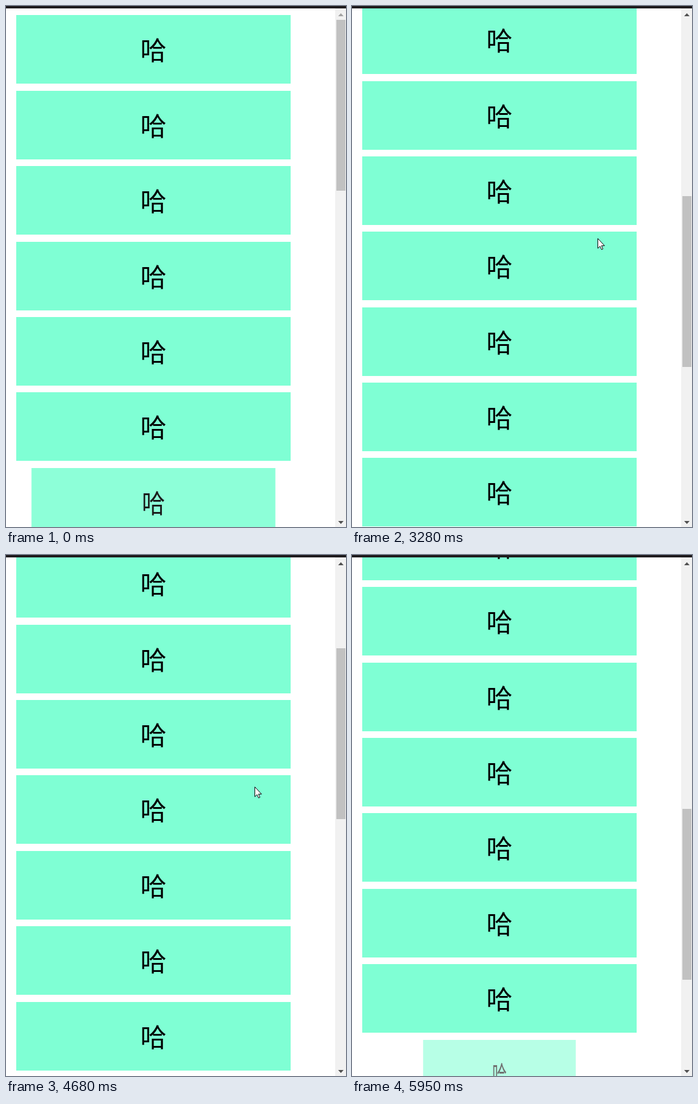
These frames come from a looping animation (565 by 866 pixels, 6190 ms). An HTML page:

```html
<!DOCTYPE html>
<html lang="zh-CN">
<head>
<meta charset="utf-8">
<title>Scroll reveal</title>
<style>
  html, body { margin: 0; width: 100%; height: 100%; overflow: hidden; background: #fff; }
  #stage { position: absolute; left: 0; top: 0; width: 565px; height: 866px; overflow: hidden; }
  #view { position: absolute; left: 0; top: 4px; width: 547px; height: 862px; overflow: hidden; }
  .item {
    position: absolute; left: 17px; top: 0; width: 456px; height: 114px;
    background: #7fffd4; color: #000; text-align: center;
    font: 43.5px/114px "Noto Sans CJK SC", "Noto Sans CJK JP", sans-serif;
  }
  #top { position: absolute; left: 0; top: 0; width: 565px; height: 4px; background: #1e1b1e; }
  #bar { position: absolute; left: 547px; top: 4px; width: 18px; height: 862px; background: #f1f1f1; }
  #thumb { position: absolute; left: 2px; top: 19px; width: 15px; height: 284px; background: #c1c1c1; }
  #overlay { position: absolute; left: 0; top: 0; }
</style>
</head>
<body>
<div id="stage">
  <div id="view"></div>
  <div id="top"></div>
  <div id="bar"><div id="thumb"></div></div>
  <svg id="overlay" width="565" height="866">
    <path id="up" d="M552 17h9l-4.5-5z"/>
    <path d="M552 856h9l-4.5 5z" fill="#505050"/>
    <path id="cursor" d="M.5 .5V16.8L4.2 13.3L6.7 18.8L9 17.8L6.6 12.4H11.6Z" fill="#fff" stroke="#000"/>
  </svg>
</div>
<script>
const LOOP = 6190, TICK = 30, PHASE = 10;
const COUNT = 20, PITCH = 125.38, HEIGHT = 114;
const VIEW_TOP = 4, VIEW_BOTTOM = 869, FIRST_TOP = 15.4;
const THUMB_RATIO = 0.328;
const ENTER = 1870, LEAVE = 5950;
const GLANCE = 761.9, PAUSE = 893.9, END = 1215.9;

const $ = id => document.getElementById(id);
const clamp = v => Math.min(1, Math.max(0, v));

// Eased progress of one move
function ease(t, start, duration) {
  const p = clamp((t - start) / duration);
  return p * p * (3 - 2 * p);
}

// Average progress of evenly spaced wheel flicks
function flicks(t, count, start, gap, duration) {
  let sum = 0;
  for (let i = 0; i < count; i++) sum += ease(t, start + i * gap, duration);
  return sum / count;
}

function scrollAt(t) {
  return GLANCE * ease(t, 2100, 350)
    + (PAUSE - GLANCE) * flicks(t, 2, 2530, 480, 270)
    - PAUSE * flicks(t, 3, 3530, 310, 189)
    + END * flicks(t, 3, 4420, 387.5, 255);
}

function cursorAt(t) {
  const enter = ease(t, ENTER, 270), nudge = ease(t, 2530, 340), drift = ease(t, 3530, 770);
  const exit = ease(t, 5500, 300), slip = ease(t, 5800, 150);
  return [
    559 - 154 * enter + 3 * nudge + 5 * drift + 125 * exit + 4 * slip,
    463 - 80 * enter + 3 * nudge - drift + 461 * exit + 20 * slip
  ].map(Math.round);
}

const items = Array.from({ length: COUNT }, () => {
  const el = document.createElement('div');
  el.className = 'item';
  el.textContent = '哈';
  return $('view').appendChild(el);
});

function render(t) {
  const scroll = scrollAt(t);
  items.forEach((el, i) => {
    const y = FIRST_TOP + i * PITCH - scroll;
    const entry = clamp((VIEW_BOTTOM - y) / HEIGHT);
    el.style.transform = `translateY(${Math.round(y) - VIEW_TOP}px) scaleX(${entry})`;
    el.style.opacity = entry;
  });
  $('thumb').style.transform = `translateY(${Math.round(scroll * THUMB_RATIO)}px)`;
  $('up').setAttribute('fill', scroll > 0.5 ? '#505050' : '#a3a3a3');

  $('cursor').setAttribute('transform', `translate(${cursorAt(t)})`);
  $('cursor').style.display = t >= ENTER && t < LEAVE ? '' : 'none';
}

// The screen refreshes in coarse ticks
function frame(now) {
  const t = now % LOOP;
  render(Math.floor((t - PHASE) / TICK) * TICK + PHASE);
  requestAnimationFrame(frame);
}
render(0);
requestAnimationFrame(frame);
</script>
</body>
</html>
```
